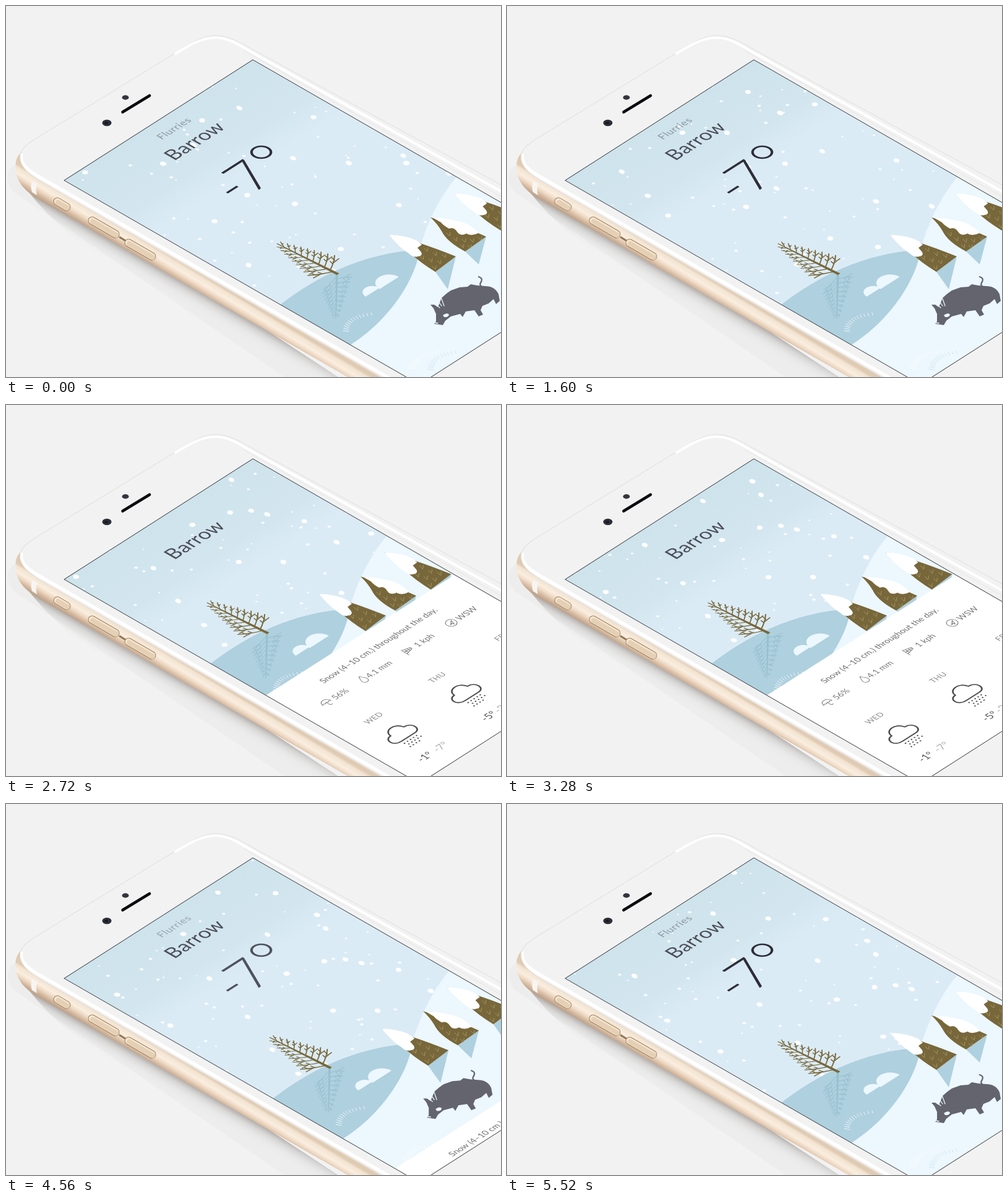
Animation, 800 px wide and 600 px high, one loop 5.6 s. Source, as an HTML page with a canvas:

```html
<!DOCTYPE html>
<html lang="en">
<head>
<meta charset="utf-8">
<title>Weather</title>
<style>
html, body { margin: 0; width: 100%; height: 100%; overflow: hidden; background: #f2f2f2; }
canvas { display: block; }
</style>
</head>
<body>
<canvas id="stage" width="800" height="600"></canvas>
<script>
const ctx = document.getElementById('stage').getContext('2d');
const LOOP = 5600, STEP = 80;
const BROWN = '#78673a', SNOW = '#ecf7fe', SHADE = '#afd0de', BOAR = '#63646d';

// Start points of the big flakes in stage pixels
const bigFlakes = [
  128,269, 254,255, 377,165, 317,185, 464,246, 467,320, 497,180, 554,254, 337,348, 392,419,
  541,393, 635,322, 642,242, 647,254, 716,271, 390,306, 95,237, 53,198, 257,69, 309,103,
  365,89, 223,135, 303,225, -112,159, 13,145, 76,75, 171,52, 139,2, -198,109, -49,83,
  58,-55, 125,-20, 45,12, 137,55, 197,58, 151,135, -35,-56, -251,37, -90,-130, -124,-64, -91,11
];
let seed = 11;
const random = () => (seed = (seed * 16807) % 2147483647) / 2147483647;
const smallFlakes = Array.from({ length: 76 }, (_, i) => ({
  x: random() * 375, y: random() * 500,
  r: i % 2 ? 2 + random() * 0.6 : 1.2 + random() * 0.5,
  speed: i % 2 ? 0.069 : 0.052
}));

const clamp = v => Math.max(0, Math.min(1, v));
const ease = p => p < 0.5 ? 2 * p * p : 1 - 2 * (1 - p) * (1 - p);
const scrollAt = t => ease(clamp((t - 2000) / 700)) - ease(clamp((t - 4000) / 780));

function fill(path, color) {
  ctx.fillStyle = color;
  ctx.fill(new Path2D(path));
}
function stroke(path, color, width) {
  ctx.strokeStyle = color;
  ctx.lineWidth = width;
  ctx.stroke(new Path2D(path));
}
function ellipse(x, y, rx, ry, color, angle = 0) {
  ctx.fillStyle = color;
  ctx.beginPath();
  ctx.ellipse(x, y, rx, ry, angle, 0, 7);
  ctx.fill();
}
function text(str, x, y, size, color, weight = 400, spacing = 0) {
  ctx.font = `${weight} ${size}px Lato, sans-serif`;
  ctx.letterSpacing = spacing + 'px';
  ctx.fillStyle = color;
  ctx.textAlign = 'center';
  ctx.fillText(str, x, y);
}
function scoped(draw) {
  ctx.save();
  draw();
  ctx.restore();
}
// Screen surface: 375 by 667 units, seen at an angle
const toScreen = () => ctx.transform(0.8133, -0.52, 0.8606, 0.495, 94, 282);

function gradient(x0, y0, x1, y1, stops) {
  const g = ctx.createLinearGradient(x0, y0, x1, y1);
  stops.forEach(([at, color]) => g.addColorStop(at, color));
  return g;
}

function drawPhone() {
  ctx.fillStyle = '#f2f2f2';
  ctx.fillRect(0, 0, 800, 600);
  ctx.lineCap = 'round';
  ctx.lineJoin = 'round';

  fill('M14 258C0 264-2 288 14 302L72 341L450 600H620Z', '#ededed');
  fill('M36 300L620 639V700L200 440Q90 370 36 300Z', gradient(300, 456, 285, 482, [
    [0, 'rgba(105,95,88,.42)'], [0.25, 'rgba(135,130,126,.22)'],
    [0.6, 'rgba(180,180,180,.08)'], [1, 'rgba(220,220,220,0)']]));

  const rim = 'M24 240C24 231 34 224 44 217L272 77C308 55 318 49 336 48C358 47 378 58 400 71L840 311';
  fill(rim + 'V800L60 286C34 272 20 258 24 240Z', '#f2f2f2');
  stroke(rim, '#e2e2e2', 1.2);
  stroke('M274 77C308 56 320 52 338 51C358 51 374 61 394 73L820 311', '#ffffff', 4);
  stroke('M384 72L810 314', '#e6e6e6', 1);

  const gold = 'M24 237C11 249 10 280 36 301L46 309L620 639V609L60 287C32 271 20 256 24 237Z';
  fill(gold, gradient(300, 425, 285, 450, [
    [0, '#dfcbb3'], [0.14, '#f3e4d2'], [0.42, '#faeee0'], [0.62, '#eed9c3'],
    [0.85, '#d2b69c'], [1, '#bda48e']]));
  stroke('M25 241C22 256 36 267 62 281L620 602', '#ffffff', 5);
  stroke('M23 241C20 256 32 270 60 286L620 608', '#e0d2c0', 1);
  fill('M42 283L51 287Q47 296 50 306L42 301Q39 292 42 283Z', '#f7f5f2');

  const button = (path, width) => {
    stroke(path, '#9b8161', width);
    stroke(path, '#f6e6d0', width - 2);
    scoped(() => {
      ctx.translate(1, 1.5);
      stroke(path, '#e6d0b5', width - 5);
    });
  };
  button('M83 316L98 325', 13);
  button('M139 347L177 369', 13);
  button('M198 383L236 405', 13);
  stroke('M184 374L192 379', '#8f7656', 3);

  ellipse(193, 148, 5.5, 3.7, '#33343c');
  ellipse(163, 189, 7.5, 5.2, '#2c2e38');
  ellipse(162, 189, 3, 2, '#171923');
  stroke('M188.5 171.5L232 145', '#0c0c10', 4.6);
}

function drawSky(s) {
  scoped(() => {
    toScreen();
    ctx.fillStyle = gradient(0, 0, 0, 190, [[0, '#cee3ec'], [0.6, '#d3e6ef'], [0.9, '#dbebf6']]);
    ctx.fillRect(0, 0, 375, 667);
    ctx.globalAlpha = clamp(1 - 1.2 * s);
    text('Flurries', 188.5, 34, 16.5, '#8b969e', 400, 0.8);
  });
}

function drawTitles(s) {
  scoped(() => {
    toScreen();
    text('Barrow', 187, 79, 32, '#4b4d56', 400, 0.2);
    ctx.globalAlpha = clamp(1 - 1.2 * s);
    text('-', 143, 207, 90, '#2d2e37', 300);
    text('7', 181, 207, 90, '#2d2e37', 300);
    text('°', 231.5, 208, 100, '#2d2e37', 300);
  });
}

function drawSnow(t) {
  for (let i = 0; i < bigFlakes.length; i += 2) {
    ellipse(bigFlakes[i] + 0.0828 * t, bigFlakes[i + 1] + 0.0437 * t,
      4.6 + (i % 3) * 0.3, 3.2 + (i % 4) * 0.1, '#ffffff', i % 5 * 0.1);
  }
  scoped(() => {
    toScreen();
    for (const f of smallFlakes) {
      ellipse((f.x + t * 0.003) % 380, (f.y + t * f.speed) % 500 - 8, f.r, f.r, 'rgba(255,255,255,.85)');
    }
  });
}

function tree(color) {
  const pairs = 9;
  ctx.strokeStyle = color;
  fill('M-2.4 2L-8-106L-6.6-106L2.4 2Z', color);
  for (let i = 0; i < pairs * 2; i++) {
    const k = i / (pairs * 2), side = i % 2 ? 1 : -1;
    const y = -7 - k * 92, x = y * 0.067;
    const w = side * (26 * (1 - k) + 4), rise = 19 - k * 8;
    ctx.lineWidth = 1.7 - k * 0.6;
    ctx.beginPath();
    ctx.moveTo(x, y);
    ctx.quadraticCurveTo(x + w * 0.6, y - rise * 0.45, x + w, y - rise);
    for (const at of [0.45, 0.72]) {
      const bx = x + w * at, by = y - rise * at * 0.8;
      ctx.moveTo(bx, by);
      ctx.lineTo(bx + w * 0.05, by - 7 * (1 - k * 0.6));
    }
    ctx.moveTo(x + w * 0.55, y - rise * 0.44);
    ctx.lineTo(x + w * 0.95, y - rise * 0.5);
    ctx.stroke();
  }
}

function drawTree() {
  scoped(() => {
    toScreen();
    ctx.translate(104, 414);
    scoped(() => {
      ctx.transform(1, 0, 0.64, -0.65, 0, 0);
      tree('#98c0cf');
    });
    tree(BROWN);
  });
}

function ticks(points) {
  for (const [x, y] of points) stroke(`M${x - 3} ${y - 2}L${x + 2} ${y + 3}L${x + 3} ${y - 3}`, '#a99a69', 0.9);
}

function snowyPeak(dx, dy) {
  scoped(() => {
    ctx.translate(dx, dy);
    fill('M727 405L694 430L714 458Z', SHADE);
    fill('M619 370Q660 378 727 405L694 430Q668 414 654 400Z', BROWN);
    ticks([[679, 394], [693, 401], [708, 404], [672, 407], [686, 411], [700, 414], [692, 423]]);
    fill('M619 370Q648 371 665 380L672 386L665 391L671 398Q674 404 666 405Q658 407 652 401Q636 391 619 370Z', '#ffffff');
  });
}

function drawMountains() {
  snowyPeak(105.5, -67);
  fill('M776 373L742 397L764 418Z', SHADE);
  fill('M686 342Q734 353 776 373L742 397Q712 381 704 364Q697 352 686 342Z', BROWN);
  ticks([[715, 369], [726, 377], [740, 379], [753, 379], [766, 376], [737, 388], [749, 389]]);
  fill('M691 343Q706 342 722 346Q750 350 764 367Q753 373 744 368Q734 373 729 365Q724 357 716 360Q707 355 703 350Z', '#ffffff');
  snowyPeak(0, 0);
}

function drawBoar() {
  stroke('M780 456Q773 456 769 454Q764 451 768 446Q771 440 764 438', BOAR, 2.3);
  fill('M692 514L695 510L695 498L691 489L686 483L692 483L698 487L704 472L712 465L719 460L733 455L746 454L751 450L762 452L774 453Q790 453 796 466L798 477L792 482L788 474L780 481L770 485L767 492L771 499L764 502L757 492L743 494L738 503L734 498L719 502L710 509L706 516Z', BOAR);
  fill('M706 500Q713 495 716 499Q715 504 708 503Z', SNOW);
  stroke('M695 472L704 485M703 471L708 485M693 481L701 488M692 512L698 513', SNOW, 1.3);
}

// Row of fine blades fanned along a curve
function grass(x0, y0, cx, cy, x1, y1, count, color, length) {
  for (let i = 0; i < count; i++) {
    const k = i / (count - 1), m = 1 - k;
    const x = m * m * x0 + 2 * m * k * cx + k * k * x1;
    const y = m * m * y0 + 2 * m * k * cy + k * k * y1;
    const l = length * (1 - k * 0.55), a = 0.15 + k * 1.1;
    stroke(`M${x} ${y}l${l * Math.cos(a)} ${l * Math.sin(a)}`, color, 0.9);
  }
}

function drawMounds() {
  scoped(() => {
    toScreen();
    ctx.fillStyle = SNOW;
    for (const [x, y, r] of [[138, 480, 19], [107.5, 478, 14]]) {
      ctx.beginPath();
      ctx.arc(x, y, r, Math.PI, 0);
      ctx.fill();
    }
  });
}

function drawScene(s) {
  const shift = s ** 1.23;
  scoped(() => {
    ctx.translate(-113 * shift, -64.6 * shift);
    fill('M732 272C705 302 683 344 668 394L557 547L660 640L960 640V400Z', SNOW);
    fill('M438 487C500 438 575 400 668 394C664 438 620 510 553 550Z', SHADE);
    drawMounds();
    grass(545, 525, 546, 501, 590, 496, 13, '#f3faff', 9);
    grass(651, 585, 658, 562, 698, 555, 14, '#ffffff', 11);
    grass(682, 587, 684, 563, 726, 558, 13, '#d0e2ea', 9);
    drawMountains();
    drawTree();
    drawBoar();
  });
}

function icon(x, y, path) {
  scoped(() => {
    ctx.translate(x, y);
    stroke(path, '#777777', 1);
  });
}

function forecast(x, day, high, low) {
  text(day, x, 146, 13, '#8c8c8c', 400, 0.3);
  scoped(() => {
    ctx.translate(x + 1, 191);
    stroke('M-13 14C-29 14-28-5-14-5C-13-20 10-22 13-6C28-6 28 14 14 14Z', '#4e4e52', 2.3);
    for (let i = 0; i < 14; i++) {
      const row = Math.floor(i / 5);
      ellipse(-13 + (i % 5) * 6 + (row % 2) * 3, 20 + row * 5.5, 1.25, 1.25, '#4e4e52');
    }
  });
  text(high, x - 15, 258, 17, '#55565a');
  text(low, x + 16, 258, 17, '#b0b0b2');
}

function drawPanel(s) {
  if (s <= 0) return;
  scoped(() => {
    toScreen();
    ctx.translate(0, 667 - 288 * s);
    ctx.fillStyle = '#ffffff';
    ctx.fillRect(0, 0, 375, 300);
    text('Snow (4–10 cm.) throughout the day.', 187.5, 39, 14, '#6f6f73');
    icon(45, 71, 'M-8 1A8 8 0 0 1 8 1Q5-2 3 1Q0-2-3 1Q-5-2-8 1M0 0V6Q1 9 4 7');
    text('56%', 72, 76, 14, '#77777b');
    icon(118, 71, 'M0-8C3-3 5 0 5 3A5 5 0 0 1-5 3C-5 0-3-3 0-8Z');
    text('4.1 mm', 149, 76, 14, '#77777b');
    icon(207, 71, 'M-6-7V8M-6-6L7-3V1L-6 4M-2-5V3M2-4V2M-6-1H7');
    text('1 kph', 239, 76, 14, '#77777b');
    icon(293, 71, 'M8 0A8 8 0 1 1-8 0A8 8 0 1 1 8 0M-4 3L4-4L1 5L0 1Z');
    text('WSW', 323, 76, 14, '#77777b');
    forecast(64, 'WED', '-1°', '-7°');
    forecast(190.5, 'THU', '-5°', '-20°');
    forecast(317, 'FRI', '-8°', '-15°');
  });
}

function frame(now) {
  const t = Math.floor((now % LOOP) / STEP) * STEP;
  const s = scrollAt(t);
  ctx.setTransform(1, 0, 0, 1, 0, 0);
  drawPhone();
  scoped(() => {
    ctx.save();
    toScreen();
    ctx.beginPath();
    ctx.rect(0, 0, 375, 667);
    ctx.restore();
    ctx.clip();
    drawSky(s);
    drawSnow(t);
    drawTitles(s);
    drawScene(s);
    drawPanel(s);
  });
  scoped(() => {
    toScreen();
    ctx.strokeStyle = '#34373b';
    ctx.lineWidth = 1;
    ctx.strokeRect(0, 0, 375, 667);
  });
}

const start = performance.now();
function tick() {
  frame(performance.now() - start);
  requestAnimationFrame(tick);
}
tick();
</script>
</body>
</html>
```
